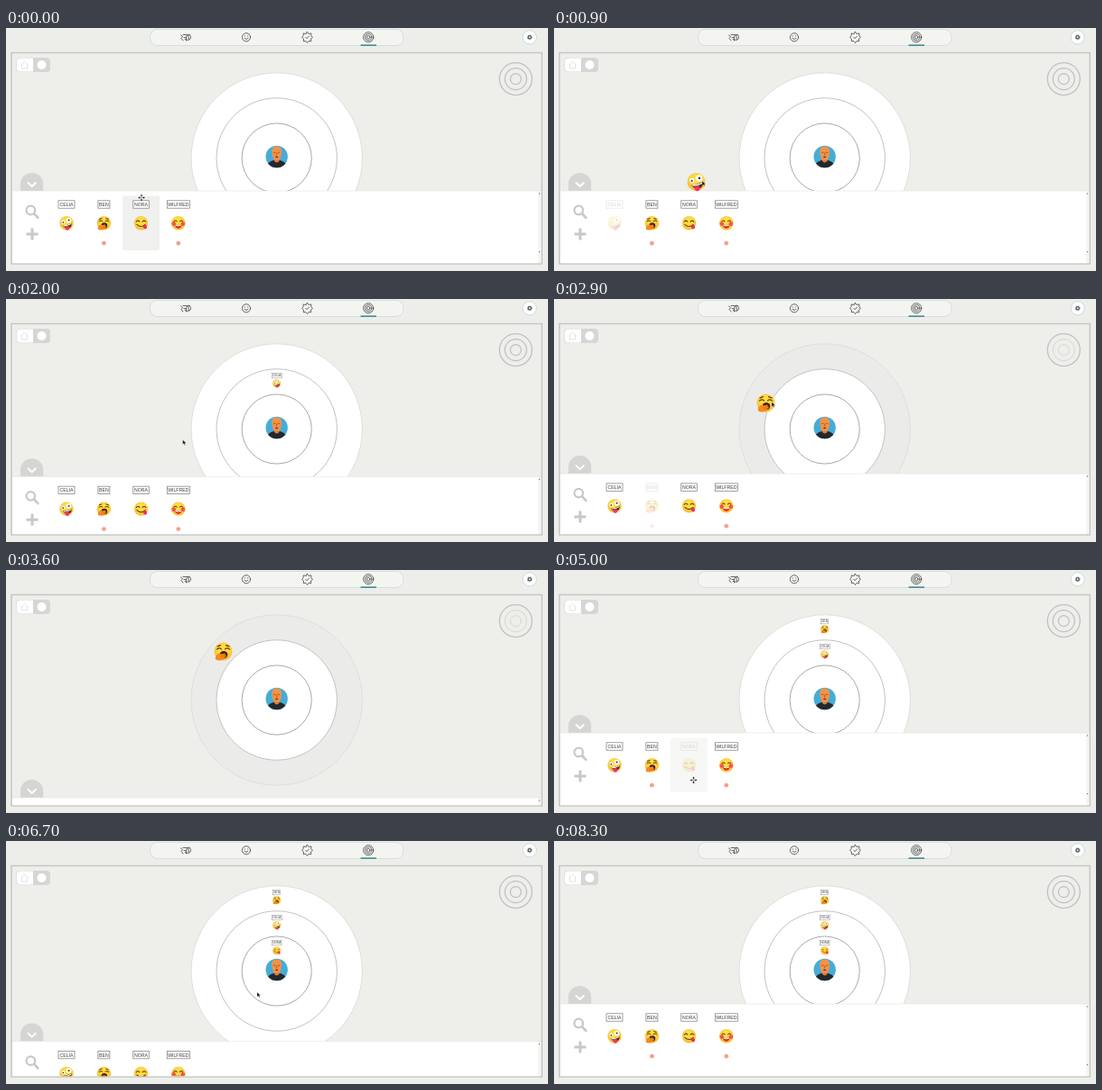
An HTML page for the animation above (9000 ms loop, 600 by 270 pixels).

```html
<!DOCTYPE html>
<html lang="en">
<head>
<meta charset="utf-8">
<title>Circle of contacts</title>
<style>
  html, body { margin: 0; width: 100%; height: 100%; overflow: hidden; background: #edeeea; }
  svg { display: block; width: 100vw; height: 100vh; }
  text { font: 5.2px "Liberation Sans", Arial, sans-serif; fill: #3c3c3c; text-anchor: middle; }
  .line { fill: none; stroke-linecap: round; stroke-linejoin: round; }
  .icon { stroke: #444; stroke-width: .8; }
</style>
</head>
<body>
<svg viewBox="0 0 600 270" xmlns="http://www.w3.org/2000/svg">
  <defs>
    <radialGradient id="skin" cx=".5" cy=".4" r=".6">
      <stop offset=".4" stop-color="#ffdd45"/><stop offset="1" stop-color="#f8b92f"/>
    </radialGradient>
    <clipPath id="inside"><rect x="7" y="28" width="585.5" height="233.3"/></clipPath>
    <clipPath id="disc"><circle cx="299.7" cy="143" r="12.2"/></clipPath>

    <!-- faces, radius 10 around the origin -->
    <g id="zany">
      <circle r="10" fill="url(#skin)"/>
      <g transform="rotate(-12)">
        <path d="M-6 2Q1 3.5 7 1Q7 7.5 1 8Q-4.5 7.5-6 2Z" fill="#5b2a12"/>
        <path d="M-5.4 2.2Q1 3.8 6.6 1.4L6.2 3Q1 5-4.8 3.8Z" fill="#fff"/>
        <path d="M-3.4 5Q-.5 3.6 2.4 5V8.4Q1.6 10.6-.8 10.4Q-3.2 10-3.4 7.5Z" fill="#f0336b"/>
        <circle cx="-4.3" cy="-2.6" r="2.6" fill="#fff"/><circle cx="-4.5" cy="-2.2" r="1.1" fill="#333"/>
        <circle cx="4" cy="-3.3" r="3.7" fill="#fff"/><circle cx="4.2" cy="-3.4" r="1.3" fill="#333"/>
      </g>
    </g>
    <g id="yawn">
      <circle r="10" fill="url(#skin)"/>
      <path class="line" d="M-6.8-2.4Q-4.4-4.6-2-2.6M2-2.6Q4.4-4.6 6.8-2.4M-6.4-5.6L-3-6.8M3-6.8L6.4-5.6" stroke="#6a3b12" stroke-width="1.3"/>
      <ellipse cx=".5" cy="3.6" rx="4.4" ry="4.2" fill="#4c2410"/>
      <path d="M-8 4.5Q-5 1.2-2.6 3L1.8 2.2Q3 3 1.6 4L3.4 4.4Q3.6 6 1.6 6L2 7.4Q0 9.6-3.4 10Q-8.8 10.4-8.8 7Z" fill="#f68a1e"/>
      <path class="line" d="M-2.4 5.2L1.6 4M-2.2 6.8L1.6 6" stroke="#d3690f" stroke-width=".6"/>
    </g>
    <g id="yum">
      <circle r="10" fill="url(#skin)"/>
      <path class="line" d="M-6.8-2Q-4.4-5-2-2M2-2Q4.4-5 6.8-2" stroke="#6a3b12" stroke-width="1.4"/>
      <path class="line" d="M-6 2Q0 7.6 6 2" stroke="#6a3b12" stroke-width="1.4"/>
      <path d="M2.2 4.8L6.4 2.2Q9.4 4.6 8.4 7Q6.8 9.4 4.4 8Z" fill="#ee2f62"/>
    </g>
    <g id="blush">
      <circle r="10" fill="url(#skin)"/>
      <circle cx="-6.6" cy="1" r="3" fill="#f4573f"/><circle cx="6.6" cy="1" r="3" fill="#f4573f"/>
      <path class="line" d="M-6.4-2.4Q-4.2-5-2-2.4M2-2.4Q4.2-5 6.4-2.4" stroke="#6a3b12" stroke-width="1.3"/>
      <path d="M-5.4 1.6Q0 4 5.4 1.6Q4.4 7.6 0 7.6Q-4.4 7.6-5.4 1.6Z" fill="#d5282c"/>
      <path d="M-4.6 2.2Q0 4 4.6 2.2L4.2 3.6Q0 5.2-4.2 3.6Z" fill="#fff"/>
    </g>

    <path id="arrow" d="M0 0V5.2L1.3 4.1L2.2 6L3 5.6L2.2 3.8H3.9Z" fill="#111" stroke="#fff" stroke-width=".3"/>
    <g id="move">
      <path d="M0-4L1.6-2H.5V-.5H2V-1.6L4 0L2 1.6V.5H.5V2H1.6L0 4L-1.6 2H-.5V.5H-2V1.6L-4 0L-2-1.6V-.5H-.5V-2H-1.6Z" fill="#222" stroke="#fff" stroke-width=".3"/>
      <circle r=".8" fill="#fff"/>
    </g>
  </defs>

  <rect width="600" height="270" fill="#edeeea"/>
  <rect x="6" y="27.5" width="587.3" height="234.5" fill="#eeeeea" stroke="#c3c5c4" stroke-width="1.4"/>

  <!-- top bar -->
  <rect x="159.500" y="1.500" width="280.500" height="18" rx="8" fill="#f4f5f1" stroke="#cfe1e2"/>
  <g class="line icon">
    <path d="M193.500 8l2 1.500-1.500 2 2 2.500M196 7.500h5l-1.500 2.500v4M197 10.500h2M202 7v6.500q3-1 2.500-4t-2.500-2M198 12.500l3 1M203 8.500"/>
    <circle cx="266" cy="10.300" r="4.600"/>
    <path d="M264 11.500q2 2.200 4 0M264.300 8.800v.3M267.700 8.800v.3"/>
    <path d="M333.500 4.300l1.600 2.200 2.700-.6.100 2.700 1.500 1.900-1.900 1.500.2 2.800-2.600-.3-1.600 2.100-1.600-2.100-2.600.3.200-2.800-1.900-1.500 1.500-1.900.1-2.700 2.700.6zM331.800 10.300l1.300 1.400 2.400-2.700"/>
    <circle cx="401.200" cy="10.200" r="5.600"/><circle cx="401.200" cy="10.200" r="3.700"/><circle cx="401.200" cy="10.200" r="1.800"/>
  </g>
  <rect x="392.500" y="18.400" width="17.500" height="1.500" fill="#3a8590"/>
  <circle cx="579.700" cy="10.300" r="7.600" fill="#fff" stroke="#c5dde0"/>
  <circle cx="579.700" cy="10.300" r="1.600" fill="none" stroke="#555" stroke-width="1.300"/>
  <circle cx="579.700" cy="10.300" r="2.500" fill="none" stroke="#555" stroke-width=".8" stroke-dasharray="1 .96"/>

  <!-- view switch -->
  <rect x="11.500" y="33" width="37.500" height="16" rx="4" fill="#d6d6d4"/>
  <path d="M30 33.500H16q-4 0-4 4V44.500q0 4 4 4H30Z" fill="#fff"/>
  <path class="line" d="M16.500 41l4-3.800 4 3.800M17.500 40.500v4.500h6v-4.500" stroke="#ddd" stroke-width=".8"/>
  <circle cx="39.500" cy="41" r="5" fill="#fff"/>

  <g id="legend" fill="none" stroke-width="1.300"></g>
  <g clip-path="url(#inside)">
    <g id="rings" stroke-width="1"></g>
    <g clip-path="url(#disc)">
      <rect x="287" y="130" width="26" height="26" fill="#45acd8"/>
      <path d="M288 156q1-7.500 8-9h7.500q7 1.500 8 9z" fill="#24282c"/>
      <path d="M297 144h5.500v4q-2.800 2.800-5.500 0z" fill="#de7c36"/>
      <path d="M294.300 137q0-5.500 5.400-5.500t5.400 5.500q0 10-5.400 10t-5.400-10z" fill="#f39247"/>
      <path class="line" d="M296.500 138.300h1.600M301.200 138.300h1.600M299.700 139v2" stroke="#8a431b" stroke-width=".7"/>
      <ellipse cx="299.700" cy="143.300" rx="1.700" ry=".9" fill="#8c2f22"/>
    </g>
    <g id="placed"></g>
    <g id="panel">
      <path d="M16 0V-7.500a12.600 12.600 0 0 1 25.200 0V0Z" fill="#d5d5d3"/>
      <path class="line" d="M24.500-9l4.200 4 4.200-4" stroke="#fff" stroke-width="2"/>
      <rect x="7" width="582" height="90" fill="#fff"/>
      <rect x="589" width="3.500" height="90" fill="#f5f5f2"/>
      <path d="M7 0H592" stroke="#e2e2df" stroke-width=".6"/>
      <path d="M589.500 3.500h2l-1-1.500zM589.500 67h2l-1 1.500z" fill="#777"/>
      <path class="line" d="M31.300 25.500l4 4.300" stroke="#c8c8c7" stroke-width="2.700"/>
      <circle cx="27.300" cy="21.500" r="4.800" fill="none" stroke="#c8c8c7" stroke-width="2.200"/>
      <path d="M29 41.500V54.500M22.500 48H35.500" stroke="#c8c8c7" stroke-width="3"/>
      <g id="tiles"></g>
    </g>
  </g>
  <use id="ghost"/>
  <use id="cursor"/>
</svg>
<script>
const LOOP = 9000, STEP = 100, OPEN = 181, SHUT = 253, CX = 299.7, CY = 144.5;
const $ = id => document.getElementById(id);

function add(parent, tag, attrs, text) {
  const el = document.createElementNS("http://www.w3.org/2000/svg", tag);
  set(el, attrs);
  if (text) el.textContent = text;
  parent.appendChild(el);
  return el;
}
function set(el, attrs) {
  for (const k in attrs) el.setAttribute(k, attrs[k]);
}

const people = [
  { name: "CELIA", face: "zany", x: 67, w: 18 },
  { name: "BEN", face: "yawn", x: 108.4, w: 13, dot: true },
  { name: "NORA", face: "yum", x: 149.5, w: 17.5 },
  { name: "WILFRED", face: "blush", x: 190.8, w: 25, dot: true }
];

// ring: 0 outer, 1 middle, 2 inner
const drags = [
  { who: 0, pick: 500, enter: 1100, drop: 1700, ring: 1 },
  { who: 1, pick: 2500, enter: 2900, drop: 3900, ring: 0 },
  { who: 2, pick: 5000, enter: 5200, drop: 6400, ring: 2 }
];

// panel moves: start time, opens?
const slides = [[900, 0], [1800, 1], [2800, 0], [4200, 1], [5100, 0], [6600, 1]];

// pointer: time, x, y, shape
const path = [
  [0, 150, 188.5, "move"], [100, 144, 191, "move"], [400, 67, 217, "move"], [500, 67, 217, "move"],
  [600, 78, 211, "arrow"], [800, 125, 190, "arrow"], [1000, 190, 152, "arrow"],
  [1200, 253, 119.5, ""], [1600, 256, 117, ""], [1700, 254, 116, "arrow"], [1800, 254, 116, "arrow"],
  [2300, 108, 217, "move"], [2500, 108, 217, "move"], [2600, 118, 205, "arrow"], [2800, 195, 141, "arrow"],
  [2900, 234.5, 115.5, "arrow"], [3000, 237, 107, ""], [3600, 240.5, 90.5, ""],
  [3900, 240.5, 90.5, "arrow"], [4200, 240.5, 90.5, "arrow"], [4900, 156, 231, "move"],
  [5000, 154.5, 233.5, "move"], [5100, 176, 207, "arrow"], [5200, 222, 172, "arrow"],
  [5400, 268, 155, ""], [5900, 278, 168, ""], [6400, 278, 168, "arrow"], [6700, 278, 168, "arrow"],
  [7500, 180, 188.5, "move"], [7800, 180, 188.5, "move"], [7900, 308, 204, "arrow"],
  [8100, 308, 204, "arrow"], [8200, 310, 207, "arrow"], [8300, 310, 207, ""], [LOOP, 310, 207, ""]
];

const radii = [94.7, 66.7, 38.6];
const rings = radii.map((r, i) => add($("rings"), "circle",
  { cx: CX, cy: CY, r, stroke: ["#dededc", "#c2c2c1", "#a9a9a8"][i] }));
const legend = [18, 12, 6].map(r => add($("legend"), "circle", { cx: 564.3, cy: 56.6, r }));

function label(parent, p, y) {
  add(parent, "rect", { x: -p.w / 2, y: y - 4.2, width: p.w, height: 8.4, fill: "#fff", stroke: "#777", "stroke-width": .7 });
  add(parent, "text", { y: y + 1.9 }, p.name);
}
const face = (parent, p, y, r) =>
  add(parent, "use", { href: "#" + p.face, transform: `translate(0 ${y}) scale(${r / 10})` });

const tiles = people.map(p => {
  const g = add($("tiles"), "g", { transform: `translate(${p.x})` });
  const back = add(g, "rect", { x: -20.5, y: 5.5, width: 41, height: 60.5, rx: 2, fill: "#f0f0ee" });
  const body = add(g, "g", {});
  label(body, p, 15);
  face(body, p, 35.8, 7.7);
  if (p.dot) add(body, "circle", { cy: 58.2, r: 2.4, fill: "#f3a091" });
  return { back, body };
});

const placed = drags.map(d => {
  const y = [57.3, 85.3, 113.3][d.ring];
  const g = add($("placed"), "g", { transform: `translate(${CX} ${y}) scale(.61)` });
  label(g, people[d.who], 0);
  face(g, people[d.who], 13.8, 7.5);
  return g;
});

function panelY(t) {
  let y = OPEN;
  for (const [start, opens] of slides) {
    if (t < start) break;
    const x = Math.min(1, (t - start) / 300);
    y = opens ? OPEN + (SHUT - OPEN) * (1 - x) ** 1.35 : OPEN + (SHUT - OPEN) * x ** 1.55;
  }
  return y;
}

function pointer(t) {
  const i = path.findIndex(p => p[0] > t) - 1;
  const [t0, x0, y0, shape] = path[i], [t1, x1, y1] = path[i + 1];
  const k = (t - t0) / (t1 - t0);
  return { x: x0 + (x1 - x0) * k, y: y0 + (y1 - y0) * k, shape };
}

function draw(t) {
  const top = panelY(t), c = pointer(t);
  const drag = drags.find(d => t >= d.pick && t < d.drop);
  const inRings = drag && t >= drag.enter;

  set($("panel"), { transform: `translate(0 ${top})` });
  tiles.forEach(({ back, body }, i) => {
    const held = drag && drag.who === i;
    const over = c.shape && Math.abs(c.x - people[i].x) < 20.5 && c.y > top + 5.5 && c.y < top + 66;
    set(back, { opacity: !over ? 0 : held ? .5 : drag ? 0 : 1 });
    set(body, { opacity: held ? .2 : 1 });
  });

  const dist = Math.hypot(c.x - CX, c.y - CY);
  const active = inRings ? radii.filter(r => dist < r).length - 1 : -1;
  rings.forEach((el, i) => set(el, { fill: i === active ? "#ebebea" : "#fff" }));
  legend.forEach((el, i) => set(el, { stroke: active < 0 || i === active ? "#c1c2c1" : "#dcdcda" }));
  placed.forEach((el, i) => set(el, { visibility: t >= drags[i].drop && !inRings ? "visible" : "hidden" }));

  const carrying = drag && t > drag.pick;
  set($("ghost"), {
    href: carrying ? "#" + people[drag.who].face : "#",
    visibility: carrying ? "visible" : "hidden",
    transform: `translate(${c.x} ${c.y})`
  });
  set($("cursor"), {
    href: "#" + c.shape,
    visibility: c.shape ? "visible" : "hidden",
    transform: `translate(${c.x + (carrying ? 6.5 : 0)} ${c.y - (carrying ? 1 : 0)})`
  });
}

const begin = performance.now();
function tick() {
  const t = (performance.now() - begin) % LOOP;
  draw(Math.floor(t / STEP) * STEP);
  requestAnimationFrame(tick);
}
tick();
</script>
</body>
</html>
```
